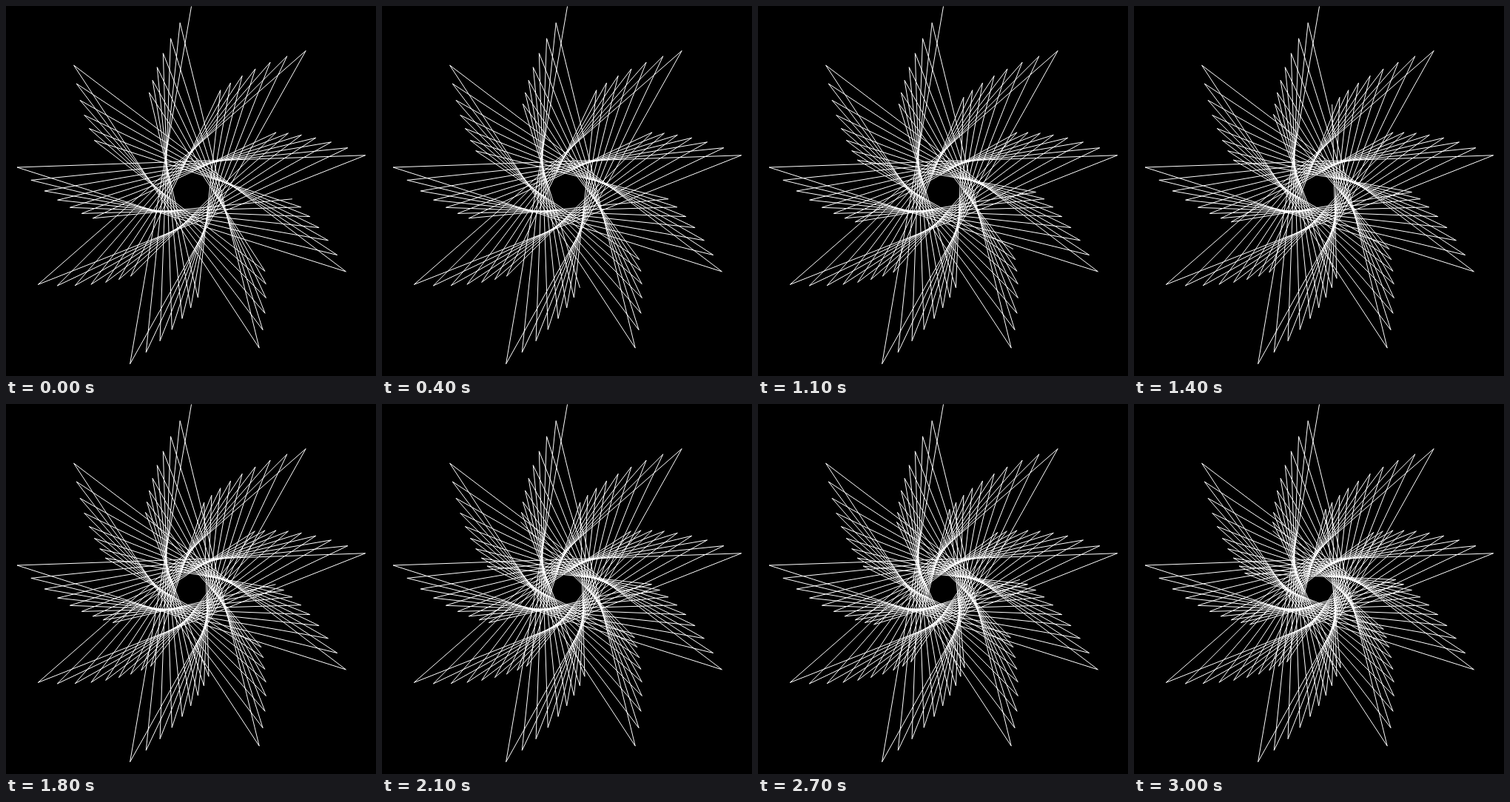
These frames come from a looping animation (500 by 500 pixels, 3.1 s). An HTML page with a canvas:

```html
<!DOCTYPE html>
<html lang="en">
<head>
<meta charset="utf-8">
<title>Spiral</title>
<style>
  html, body { margin: 0; width: 100%; height: 100%; overflow: hidden; background: #000; }
  canvas { display: block; width: 500px; height: 500px; }
</style>
</head>
<body>
<canvas id="stage" width="500" height="500"></canvas>
<script>
const SIZE = 500, RADIUS = 250, CENTER = 250.5;
const TURN = 2.8, SHRINK = 0.99;
const FIRST = 60, STEPS = 31, STEP_MS = 100;

const ctx = document.getElementById('stage').getContext('2d');
ctx.strokeStyle = '#fff';
ctx.lineWidth = 1;

function point(n) {
  const r = RADIUS * SHRINK ** n, a = TURN * n;
  return [CENTER - r * Math.sin(a), CENTER - r * Math.cos(a)];
}

// Each segment is stroked on its own, so crossings build up brightness
function segment(n) {
  ctx.beginPath();
  ctx.moveTo(...point(n));
  ctx.lineTo(...point(n + 1));
  ctx.stroke();
}

function draw(count) {
  ctx.fillStyle = '#000';
  ctx.fillRect(0, 0, SIZE, SIZE);
  for (let n = 0; n < count; n++) segment(n);
}

let start = null, shown = -1;
function tick(now) {
  if (start === null) start = now;
  const count = FIRST + Math.floor((now - start) / STEP_MS) % STEPS;
  if (count !== shown) draw(shown = count);
  requestAnimationFrame(tick);
}
draw(FIRST);
requestAnimationFrame(tick);
</script>
</body>
</html>
```
